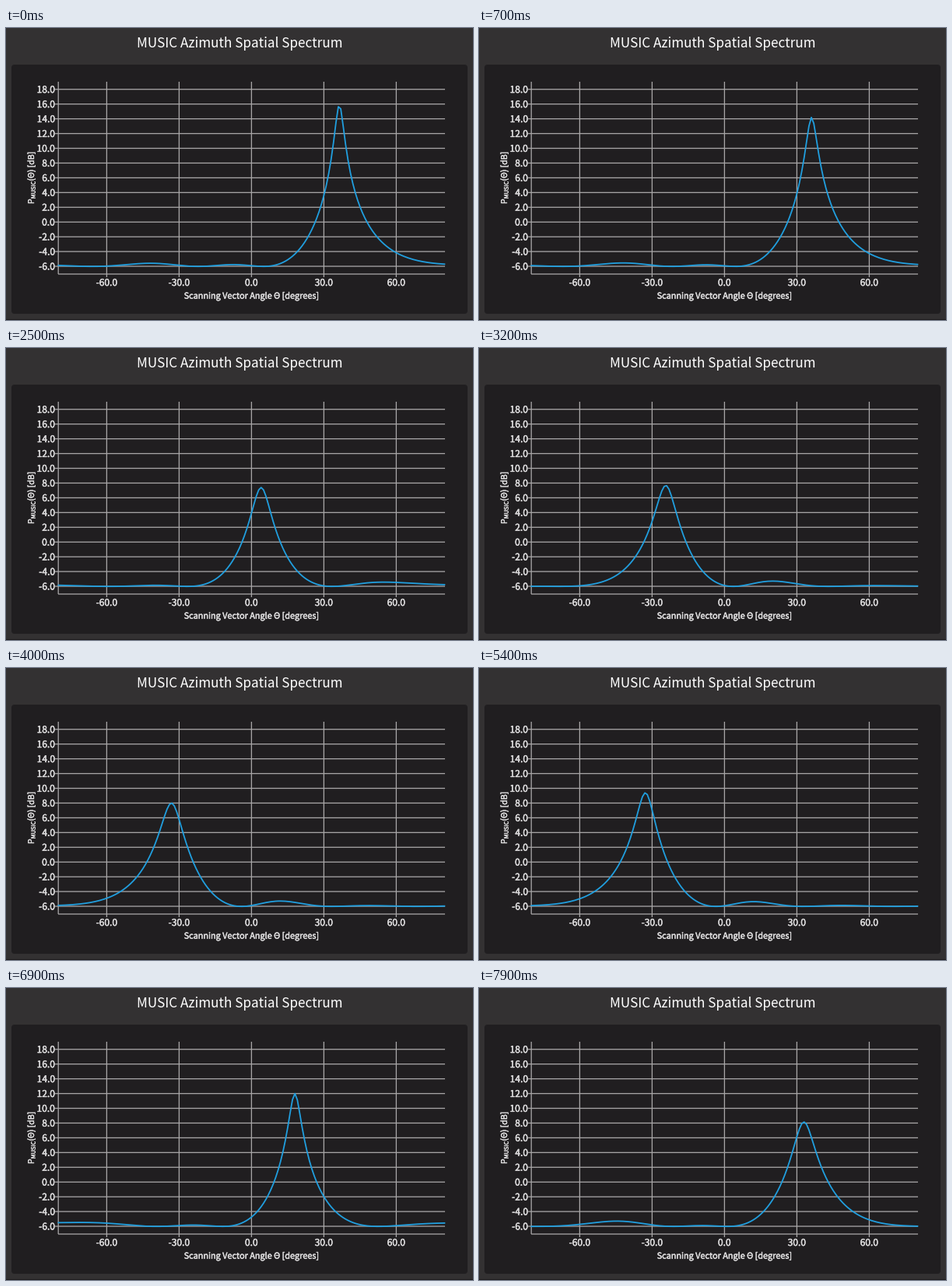
Write a matplotlib script that moves like this. It is 600 px wide and 375 px high and loops after 8 s.

```python
import numpy as np
import matplotlib as mpl
import matplotlib.pyplot as plt
from matplotlib.animation import FuncAnimation
from matplotlib.patches import FancyBboxPatch
from matplotlib.patheffects import withStroke

W, H, DPI = 600, 375, 100
FRAMES, STEP = 80, 100
FONT = "Noto Sans CJK JP"
BACK, PANEL, INK = "#333132", "#201e20", "#dcdbdc"
GRID, CURVE = "#a8a6a7", "#209fdf"
PX = 72 / DPI

mpl.rcParams.update({
    "font.family": FONT,
    "axes.unicode_minus": False,
    "mathtext.fontset": "custom",
    "mathtext.rm": FONT,
})

fig = plt.figure(figsize=(W / DPI, H / DPI), dpi=DPI, facecolor=BACK)
ax = fig.add_axes([0, 0, 1, 1])
ax.set_xlim(0, W)
ax.set_ylim(H, 0)
ax.axis("off")


def px_x(deg):
    return 315.4 + 3.1 * deg


def px_y(db):
    return 249.2 - 9.47 * db


def label(x, y, s, size, **kw):
    """Axis text, thickened to a medium weight."""
    kw = {"ha": "center", "va": "baseline", **kw}
    ax.text(x, y, s, fontsize=size * PX, color=INK,
            path_effects=[withStroke(linewidth=0.45 * PX, foreground=INK)],
            **kw)


def rule(x, y, color=GRID):
    ax.plot(x, y, color=color, lw=1.3 * PX, solid_capstyle="butt", snap=False)


ax.add_patch(FancyBboxPatch((11, 51), 578, 312, fc=PANEL, ec="none",
                            boxstyle="round,pad=4,rounding_size=4"))
rule([0, W], [374.5, 374.5], PANEL)

for db in range(-6, 19, 2):
    rule([63, 564], [px_y(db)] * 2)
    label(63, px_y(db) + 4.4, f"{db:.1f}", 12, ha="right")
for deg in range(-60, 61, 30):
    rule([px_x(deg)] * 2, [69, 320])
    label(px_x(deg), 331, f"{deg:.1f}", 12)
rule([67.2, 67.2], [69, 316])
rule([67, 564], [316, 316])

ax.text(300, 25.2, "MUSIC Azimuth Spatial Spectrum", color="white",
        fontsize=17.1 * PX, ha="center", va="baseline")
label(315, 347.6, "Scanning Vector Angle Θ [degrees]", 10.85)
label(33, 192, r"P$_{\mathrm{MUSIC}}$(Θ) [dB]", 10.5,
      rotation=90, va="center")

scan = np.arange(-80, 81)
line, = ax.plot([], [], color=CURVE, lw=1.8 * PX, zorder=5,
                solid_joinstyle="round")

PEAK_T = [0, 1.4, 2.5, 4.0, 4.9, 5.4, 6.2, 6.9, 7.2, 7.9]
PEAK_DB = [15.9, 12.5, 7.4, 8.0, 10.2, 9.4, 12.1, 12.0, 13.2, 8.15]


def ease(t, a, b):
    s = np.clip((t - a) / (b - a), 0, 1)
    return s * s * (3 - 2 * s)


def bearing(t):
    start = np.interp(t, [0, 1.4], [36.4, 35.8])
    rest = np.interp(t, [4.0, 5.4], [-33.2, -32.8])
    deg = start + (rest - start) * ease(t, 1.4, 3.72)
    return deg + (32.9 - deg) * ease(t, 5.4, 7.57)


def beam(psi):
    """Centred response of a four-element array."""
    half = np.sin(psi / 2)
    half = np.where(np.abs(half) < 1e-9, 1e-9, half)
    return np.sin(2 * psi) / (4 * half)


def spectrum(t):
    loss = 0.25 * 10 ** (-np.interp(t, PEAK_T, PEAK_DB) / 10)
    # Alternating phase error lifts one sidelobe and lowers the other.
    err = np.sqrt(max(loss - 0.003, 0))
    err *= 1 - 0.33 * np.exp(-((t - 2.5) / 0.5) ** 2)
    gain = np.sqrt(1 - loss - err ** 2 / 5)
    psi = np.pi * (np.sin(np.radians(scan)) - np.sin(np.radians(bearing(t))))
    psi = psi + 0.4 * err
    power = (gain * beam(psi) - err * beam(psi - np.pi)) ** 2
    return -10 * np.log10(4 * (1 - power))


def draw(i):
    line.set_data(px_x(scan), px_y(spectrum(i * STEP / 1000)))
    return line,


anim = FuncAnimation(fig, draw, frames=FRAMES, interval=STEP,
                     repeat=True, repeat_delay=0)
plt.show()
```
